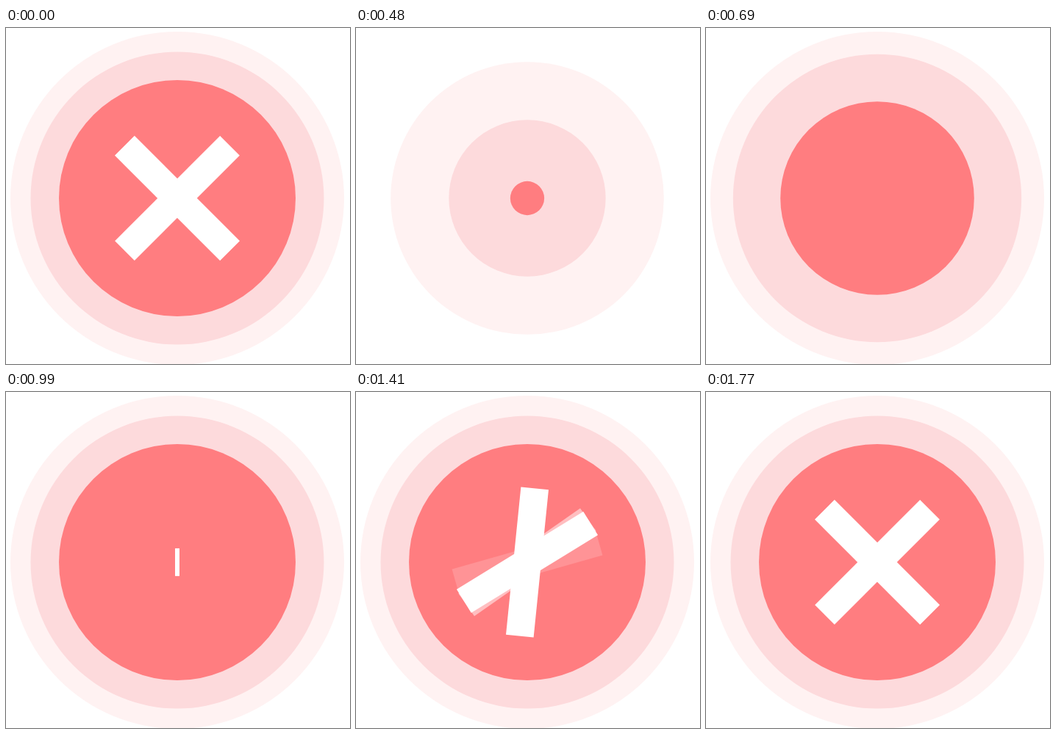
Write an HTML page that moves like this. It is 468x458 px and loops after 2250 ms.

```html
<!DOCTYPE html>
<html lang="en">
<head>
<meta charset="utf-8">
<title>Error badge</title>
<style>
  html, body { margin: 0; width: 100%; height: 100%; overflow: hidden; background: #fff; }
  svg { display: block; width: 468px; height: 458px; }
</style>
</head>
<body>
<svg viewBox="0 0 468 458" xmlns="http://www.w3.org/2000/svg">
  <g id="badge" transform="translate(233 232)"></g>
</svg>
<script>
  const LOOP = 2250, STEP = 30, HOLD = 120;
  const BAR = { width: 37.8, length: 202.3 };
  const badge = document.getElementById('badge');

  // Timing curve from (0,0) to (1,1) with flat ends; x1 and x2 are the handles.
  function easing(x1, x2) {
    return x => {
      if (x <= 0) return 0;
      if (x >= 1) return 1;
      let lo = 0, hi = 1;
      for (let i = 0; i < 30; i++) {
        const s = (lo + hi) / 2, r = 1 - s;
        if (3 * r * r * s * x1 + 3 * r * s * s * x2 + s * s * s < x) lo = s;
        else hi = s;
      }
      return lo * lo * (3 - 2 * lo);
    };
  }
  const grow = easing(0.49, 0.46);
  const swing = easing(0.33, 0.83);
  const progress = (ease, t, start, end) => ease((t - start) / (end - start));

  function add(tag, attrs) {
    const el = document.createElementNS('http://www.w3.org/2000/svg', tag);
    for (const name in attrs) el.setAttribute(name, attrs[name]);
    return badge.appendChild(el);
  }

  const discs = [
    { r: 227, fill: '#fff2f2', start: 120 },
    { r: 199.5, fill: '#fddadc', start: 210 },
    { r: 161, fill: '#ff7d80', start: 330 }
  ];
  for (const d of discs) d.el = add('circle', { fill: d.fill });

  // Two faint companions sit below the solid pair.
  const bars = [
    { turn: 135, start: 1055, end: 1650, alpha: 0.17, ease: swing },
    { turn: 135, start: 1065, end: 1770, alpha: 0.5, ease: swing },
    { turn: 135, start: 1037, end: 1770, alpha: 1, ease: swing },
    { turn: 45, start: 1281, end: 1770, alpha: 1, ease: grow }
  ];
  for (const b of bars) b.el = add('rect', { fill: '#fff', 'fill-opacity': b.alpha });

  function draw(t) {
    for (const d of discs) {
      d.el.setAttribute('r', d.r * progress(grow, t, d.start, d.start + 542));
    }
    const size = progress(grow, t, 930, 1125);
    const w = BAR.width * size ** 1.1, h = BAR.length * size;
    for (const b of bars) {
      const angle = b.turn * progress(b.ease, t, b.start, b.end);
      b.el.setAttribute('x', -w / 2);
      b.el.setAttribute('y', -h / 2);
      b.el.setAttribute('width', w);
      b.el.setAttribute('height', h);
      b.el.setAttribute('transform', `rotate(${angle})`);
    }
  }

  const origin = performance.now();
  function tick() {
    const t = (performance.now() - origin) % LOOP;
    draw(t < HOLD ? LOOP : Math.floor(t / STEP) * STEP);
    requestAnimationFrame(tick);
  }
  tick();
</script>
</body>
</html>
```
